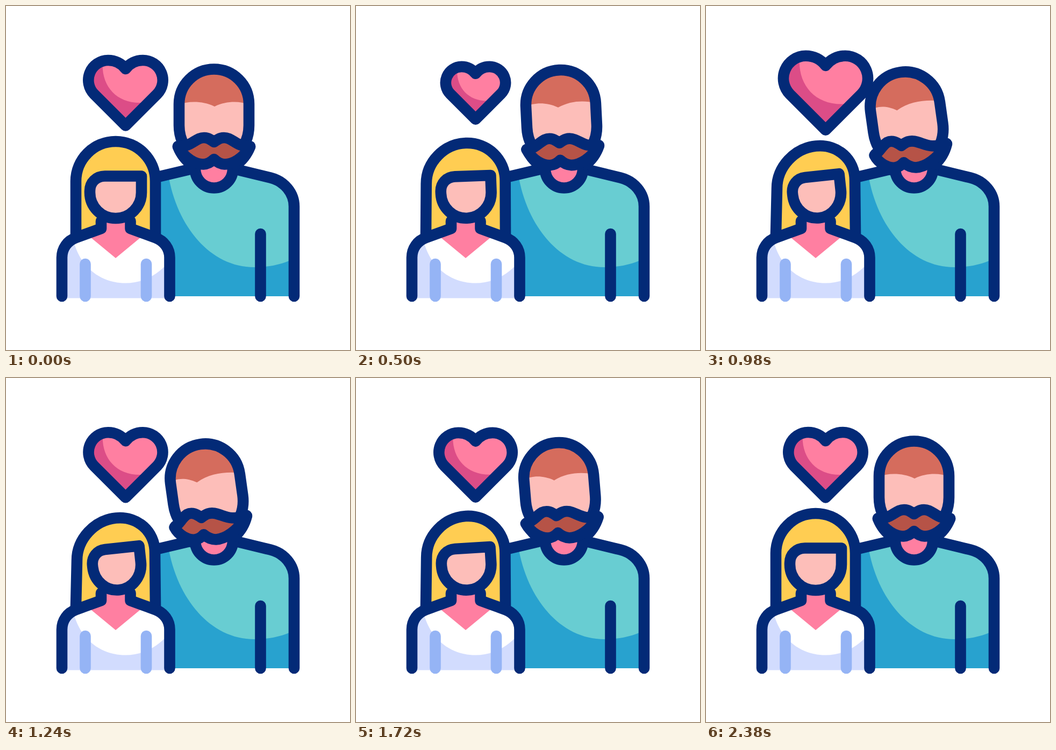
Animation, 640 px wide and 640 px high, one loop 2.4 s. Source, as an HTML page:

```html
<!DOCTYPE html>
<html lang="en">
<head>
<meta charset="utf-8">
<title>Couple with heart</title>
<style>
  html, body { margin: 0; width: 100%; height: 100%; overflow: hidden; background: #fff; }
  svg { display: block; width: 100%; height: 100%; }
  .line {
    fill: none; stroke: #032a77; stroke-width: 20.6;
    stroke-linecap: round; stroke-linejoin: round; vector-effect: non-scaling-stroke;
  }
</style>
</head>
<body>
<svg viewBox="0 0 640 640">
  <!-- man -->
  <path fill="#28a2cf" d="M278 319 L350 302 H428 L492 319.5 C518 326 536 348 536 373 V540 H278 Z"/>
  <path fill="#68cdd2" d="M302 314 C318 410 380 486 462 486 C485 486 510 482 534 471 V373 C536 348 518 326 492 319.5 L428 304 H350 Z"/>
  <path class="line" d="M278 319 L350 302 M426 303.5 L492 319.5 C518 326 536 348 536 373 V540 M473.500 424 V540"/>
  <path fill="#ff7fa1" d="M352 285 H422 V303.500 A35 35 0 0 1 352 303.500 Z"/>
  <path class="line" d="M352 303.500 A35 35 0 0 0 422 303.500"/>
  <g id="head">
    <path fill="#fdbeb9" d="M332 262 C326 250 322 237 322 222 V182.500 A65 65 0 0 1 452 182.500 V222 C452 237 448 250 442 262 Z"/>
    <path id="crop" fill="#d56c5d"/>
    <path class="line" d="M332 260 C326 250 322 237 322 222 V182.500 A65 65 0 0 1 452 182.500 V222 C452 237 448 250 442 260"/>
    <path class="line" d="M320 262 C326 277 335 288 347 296 M454 262 C448 277 439 288 427 296"/>
    <path id="tache" class="line" style="fill:#b65347"/>
  </g>

  <!-- woman -->
  <path id="hair" class="line" style="fill:#ffcd52"/>
  <path fill="#d2dcfe" d="M104 543.500 V468 C104 451 114 437 130 431 L177 414 H231.500 L278 431 C294 437 304.500 451 304.500 468 V543.500 Z"/>
  <path fill="#fff" d="M126 438 C138 485 175 515.500 222 515.500 C252 515.500 277 504 302 478 V468 L297 449 L278 431 L231.500 414 H177 L130 431 Z"/>
  <path fill="#ff7fa1" d="M177 392 H231.500 V414 L250 431 L204 469 L158 431 L177 414 Z"/>
  <path class="line" style="stroke:#95b4f5" d="M147.500 480 V540 M261 480 V540"/>
  <path class="line" d="M104 540 V468 C104 451 114 437 130 431 L177 414 V400 M304.500 540 V468 C304.500 451 294 437 278 431 L231.500 414 V400"/>
  <path id="face" class="line" style="fill:#fdbeb9" d="M184 316.500 C168 316.500 156 328 156 344 V347 A48 48 0 0 0 252 347 V316.500 Z"/>

  <!-- heart -->
  <g id="heart">
    <path fill="#dc4d87" d="M222.500 222.500 L164 164 A37 37 0 0 1 190 101 C203 101 215 107 222.500 117 C230 107 241.500 101 254.500 101 A37 37 0 0 1 281 164 Z"/>
    <path fill="#ff7fa1" d="M180 103 C176 150 208 187 264 179 L280.600 164 A37 37 0 0 0 254.500 101 C241.500 101 230 107 222.500 117 C215 107 203 101 190 101 Z"/>
    <path class="line" d="M222.500 222.500 L164 164 A37 37 0 0 1 190 101 C203 101 215 107 222.500 117 C230 107 241.500 101 254.500 101 A37 37 0 0 1 281 164 Z"/>
  </g>
</svg>
<script>
const LOOP = 2400;
const [head, crop, tache, hair, face, heart] =
  ["head", "crop", "tache", "hair", "face", "heart"].map(id => document.getElementById(id));

const LEAN = [[160, 0], [1000, 1], [1350, 1], [2190, 0]];
const BEAT = [[260, 1], [660, 0.7], [1020, 1.15], [1100, 1.15], [1460, 0.7], [1760, 1]];

const mix = (a, b, k) => a + (b - a) * k;

// Value at time t, eased in and out between [time, value] keys
function track(keys, t) {
  if (t <= keys[0][0]) return keys[0][1];
  for (let i = 1; i < keys.length; i++) {
    const [t0, a] = keys[i - 1], [t1, b] = keys[i];
    if (t < t1) {
      const u = (t - t0) / (t1 - t0);
      return mix(a, b, u * u * (3 - 2 * u));
    }
  }
  return keys[keys.length - 1][1];
}

// Slides and tilts the middle of a facial feature while its ends stay put
function turn(half, k, tilt) {
  return (x, y) => {
    const u = (x - 387) / half;
    const w = k * Math.max(0, 1 - u * u);
    return (x - 17 * w).toFixed(2) + " " + (y + tilt * u * w).toFixed(2);
  };
}

function cropPath(k) {
  const p = turn(65, k, 0), lift = 2.5 * k;
  return `M322 ${183 - lift}C${p(340, 177 - lift)} ${p(365, 176 - lift)} ${p(388, 187)}` +
    `C${p(411, 176 - lift)} ${p(434, 177 - lift)} 452 ${183 - lift}A65 65 0 0 0 322 ${183 - lift}Z`;
}

function tachePath(k) {
  const p = turn(77, k, 11);
  const tip = `${320 - 2 * k} ${261 + 3 * k}`;
  return `M${tip}C${p(340, 262)} ${p(346, 253)} ${p(359, 247)}` +
    `C${p(371, 242)} ${p(379, 247)} ${p(387, 253)}` +
    `C${p(395, 247)} ${p(403, 242)} ${p(415, 247)}` +
    `C${p(428, 253)} ${p(434, 262)} 454 261` +
    `C${p(442, 284)} ${p(421, 294.5)} ${p(407, 294.5)}` +
    `C${p(398, 294)} ${p(392, 290)} ${p(387, 285)}` +
    `C${p(382, 290)} ${p(376, 294)} ${p(367, 294.5)}` +
    `C${p(353, 294.5)} ${p(332, 284)} ${tip}Z`;
}

function hairPath(k) {
  const cx = 204 + 0.5 * k, cy = 326 + 6 * k;
  const rx = 74 - 1.5 * k, ry = 74 - 2.5 * k;
  const p = (u, v) =>
    (cx + rx * u).toFixed(2) + " " + (cy + ry * v - 0.1 * k * rx * u).toFixed(2);
  const c = 0.552;
  return `M130 424L${p(-1, 0)}C${p(-1, -c)} ${p(-c, -1)} ${p(0, -1)}` +
    `C${p(c, -1)} ${p(1, -c)} ${p(1, 0)}L278 424`;
}

function draw(t) {
  const k = track(LEAN, t), s = track(BEAT, t);
  head.setAttribute("transform", `rotate(${-8 * k} 414.5 303)`);
  crop.setAttribute("d", cropPath(k));
  tache.setAttribute("d", tachePath(k));
  hair.setAttribute("d", hairPath(k));
  face.setAttribute("transform", `translate(${204 + 2 * k} 347) ` +
    `matrix(${1 - 0.068 * k} ${-0.1 * k} ${0.105 * k} ${1 - 0.015 * k} 0 0) translate(-204 -347)`);
  heart.setAttribute("transform", `translate(222.5 162) scale(${s}) translate(-222.5 -162)`);
}

const start = performance.now();
function tick() {
  draw((performance.now() - start) % LOOP);
  requestAnimationFrame(tick);
}
draw(0);
requestAnimationFrame(tick);
</script>
</body>
</html>
```
